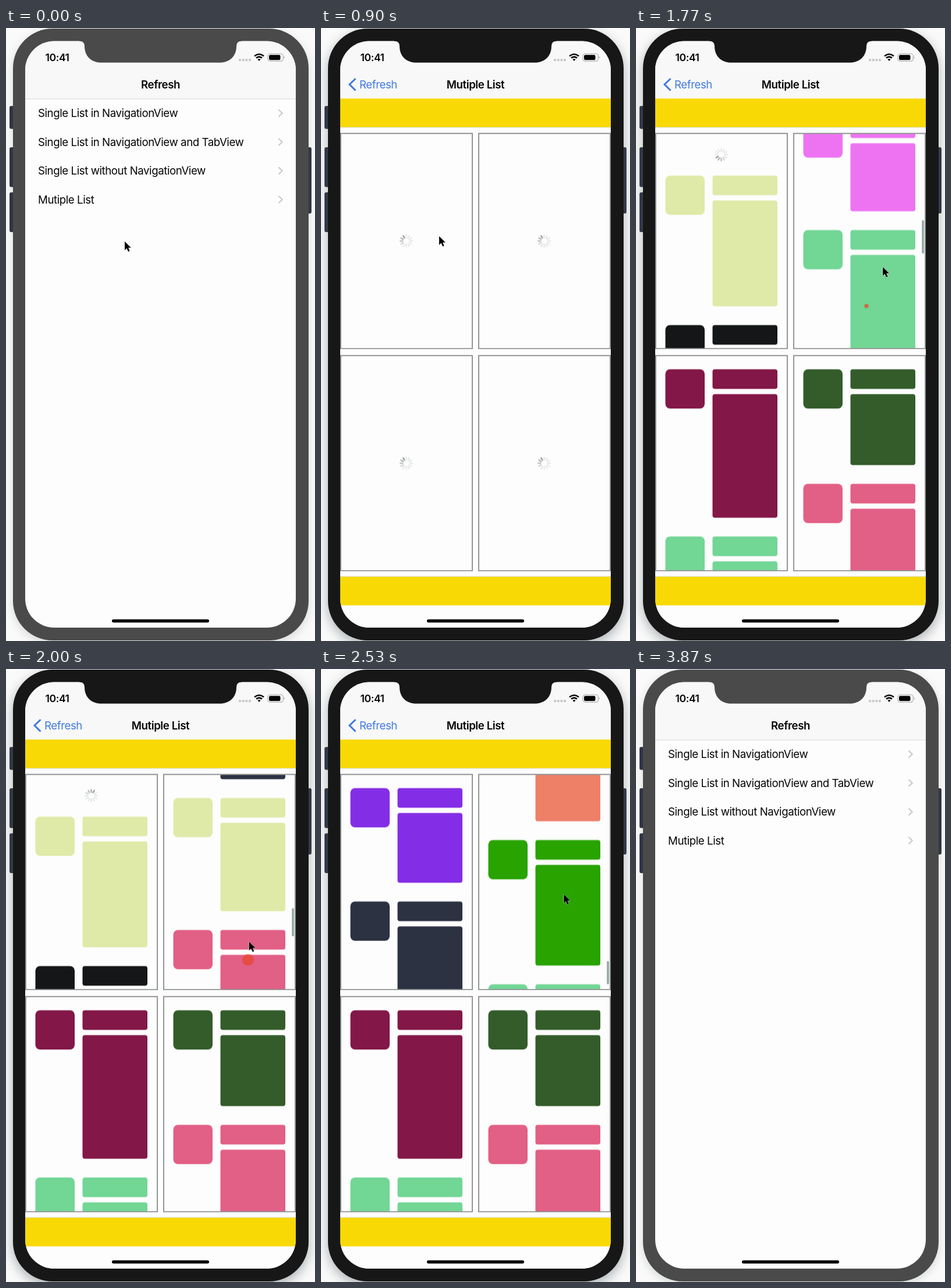
Animation, 531 px wide and 1054 px high, one loop 4370 ms. Source, as an HTML page:

```html
<!DOCTYPE html>
<html lang="en">
<head>
<meta charset="utf-8">
<title>Refresh</title>
<style>
  html, body { margin: 0; width: 100%; height: 100%; overflow: hidden; background: #fafafa; }
  #stage { display: block; width: 531px; height: 1054px; }
  text { font: 400 18.7px Inter, "Open Sans", sans-serif; letter-spacing: -.024em; fill: #050505; }
  .bold { font-weight: 600; }
  .mid { text-anchor: middle; }

  .body, .notch, .slide-in, .slide-out, .loading, .loaded, .pull, .release, .busy, .old, .new,
  .drag, .scroll, .thumb, .cursor, .touch {
    animation: 4370ms linear infinite;
  }

  /* window focus */
  .body { animation-name: body; animation-timing-function: step-end; }
  .notch { animation-name: notch; animation-timing-function: step-end; }
  @keyframes notch { 0% { fill: #4a4a4a } 4% { fill: #171717 } 86.3%, 100% { fill: #4a4a4a } }
  @keyframes body {
    0%, 86.3%, 100% { fill: #4a4a4a; filter: drop-shadow(0 5px 8px rgba(70, 80, 85, .2)) }
    4% { fill: #171717; filter: drop-shadow(0 7px 10px rgba(70, 85, 90, .45)) }
  }

  /* page push and pop */
  .slide-in { animation-name: slide-in; }
  .slide-out { animation-name: slide-out; }
  @keyframes slide-in {
    0%, 5.5%, 82%, 100% { transform: translateX(var(--off)); opacity: var(--o, 1) }
    12.5%, 75% { transform: translateX(0); opacity: 1 }
    5.5%, 75% { animation-timing-function: cubic-bezier(.2, .8, .2, 1) }
  }
  @keyframes slide-out {
    0%, 5.5%, 82%, 100% { transform: translateX(0); opacity: 1 }
    12.5%, 75% { transform: translateX(var(--off)); opacity: var(--o, 1) }
    5.5%, 75% { animation-timing-function: cubic-bezier(.2, .8, .2, 1) }
  }

  /* hard switches */
  .loading, .loaded, .pull, .release, .busy, .old, .new { animation-timing-function: step-end; }
  .loading { animation-name: loading; }
  .loaded { animation-name: loaded; }
  .pull { animation-name: pull; }
  .release { animation-name: release; }
  .busy { animation-name: busy; }
  .old { animation-name: old; }
  .new { animation-name: new; }
  @keyframes loading { 0% { opacity: 1 } 24%, 100% { opacity: 0 } }
  @keyframes loaded { 0% { opacity: 0 } 24%, 100% { opacity: 1 } }
  @keyframes pull { 0% { opacity: 1 } 29%, 100% { opacity: 0 } }
  @keyframes release { 0%, 31%, 100% { opacity: 0 } 29% { opacity: 1 } }
  @keyframes busy { 0%, 49%, 100% { opacity: 0 } 31% { opacity: 1 } }
  @keyframes old { 0% { opacity: 1 } 46.5%, 100% { opacity: 0 } }
  @keyframes new { 0% { opacity: 0 } 46.5%, 100% { opacity: 1 } }

  .spin { animation: spin 546.25ms steps(12) infinite; }
  @keyframes spin { to { transform: rotate(360deg) } }

  .drag { animation-name: drag; }
  @keyframes drag {
    0%, 25.5%, 49.5%, 100% { transform: translateY(0) }
    28.15% { transform: translateY(98px); animation-timing-function: ease-out }
    30%, 31% { transform: translateY(115px) }
    31%, 46.5% { animation-timing-function: ease-out }
    33.5%, 46.5% { transform: translateY(49px) }
  }

  .scroll { animation-name: scroll; }
  @keyframes scroll {
    0%, 33.5% { transform: translateY(0) }
    40.5% { transform: translateY(-930px) }
    44% { transform: translateY(-1250px) }
    47% { transform: translateY(-1800px) }
    51.03% { transform: translateY(-2400px) }
    55% { transform: translateY(-2820px); animation-timing-function: ease-out }
    60%, 100% { transform: translateY(-2960px) }
  }
  .thumb { animation-name: thumb; }
  @keyframes thumb {
    0%, 33.4% { y: 4px; height: 75px; opacity: 0 }
    33.5% { y: 4px; height: 75px; opacity: 1 }
    40.5% { y: 149.5px; height: 58px }
    51.03% { y: 311px; height: 40px }
    60% { y: 325px; height: 40px; opacity: 1 }
    64%, 100% { y: 325px; height: 40px; opacity: 0 }
  }

  .cursor { animation-name: cursor; animation-timing-function: ease-in-out; }
  @keyframes cursor {
    0% { transform: translate(204px, 367px); opacity: 1 }
    3.2%, 8% { transform: translate(203px, 298px) }
    16%, 20.7% { transform: translate(203px, 358px) }
    24%, 25.5% { transform: translate(196px, 270px) }
    28.15% { transform: translate(190px, 516px) }
    30%, 31% { transform: translate(190px, 556px) }
    33.5% { transform: translate(396px, 478px) }
    36.5% { transform: translate(410px, 330px) }
    39% { transform: translate(396px, 478px) }
    40.5% { transform: translate(424px, 411px) }
    42.5% { transform: translate(430px, 340px) }
    45% { transform: translate(416px, 500px) }
    47.5% { transform: translate(424px, 350px) }
    51.03% { transform: translate(419px, 480px) }
    54% { transform: translate(424px, 350px) }
    60% { transform: translate(415px, 400px) }
    70% { transform: translate(82px, 97px) }
    72.5%, 76% { transform: translate(78px, 93px) }
    80% { transform: translate(130px, 220px) }
    86.2% { transform: translate(300px, 1060px); opacity: 1 }
    86.3%, 100% { transform: translate(300px, 1060px); opacity: 0 }
  }

  .touch { animation-name: touch; }
  @keyframes touch {
    0%, 3.6% { transform: translate(203px, 298px) scale(0) }
    4.3%, 5% { transform: translate(203px, 298px) scale(1) }
    6%, 6.1% { transform: translate(203px, 298px) scale(0) }
    6.2%, 25.5% { transform: translate(196px, 270px) scale(0) }
    26.5%, 30.5% { transform: translate(196px, 270px) scale(1) }
    31.5% { transform: translate(196px, 270px) scale(0) }
    31.6%, 33.5% { transform: translate(396px, 478px) scale(0) }
    34.3%, 36% { transform: translate(396px, 478px) scale(1) }
    37%, 40.2% { transform: translate(396px, 478px) scale(0) }
    41.3%, 42% { transform: translate(396px, 478px) scale(1) }
    43% { transform: translate(396px, 478px) scale(0) }
    43.1%, 45% { transform: translate(416px, 500px) scale(0) }
    46%, 47% { transform: translate(416px, 500px) scale(1) }
    48% { transform: translate(416px, 500px) scale(0) }
    48.1%, 51.5% { transform: translate(419px, 480px) scale(0) }
    52.3%, 53.4% { transform: translate(419px, 480px) scale(1) }
    54.4% { transform: translate(419px, 480px) scale(0) }
    54.5%, 73.2% { transform: translate(78px, 93px) scale(0) }
    74%, 74.6% { transform: translate(78px, 93px) scale(1) }
    75.5%, 100% { transform: translate(78px, 93px) scale(0) }
  }
</style>
</head>
<body>
<svg id="stage" viewBox="0 0 531 1054">
  <defs>
    <clipPath id="screen"><rect x="33" y="22.5" width="465" height="1008.5" rx="50"/></clipPath>
  </defs>

  <g fill="#2e3346" stroke="#3b3d44">
    <rect x="6.5" y="134.5" width="9" height="38.5" rx="2"/>
    <rect x="6.5" y="205.5" width="9" height="67.5" rx="2"/>
    <rect x="6.5" y="283" width="9" height="67.5" rx="2"/>
    <rect x="515.5" y="205.5" width="9" height="113" rx="2"/>
  </g>
  <rect class="body" x="12" y="1" width="508" height="1052" rx="68"/>

  <g clip-path="url(#screen)">
    <rect x="33" y="22" width="465" height="1010" fill="#fdfdfd"/>
    <g id="menu" class="slide-out" style="--off:-140px"></g>
    <rect x="33" y="22" width="465" height="99.5" fill="#f8f8f8"/>
    <rect x="33" y="121.5" width="465" height="1" fill="#d6d6d6"/>
    <g id="detail" class="slide-in" style="--off:466px"></g>

    <text class="bold mid slide-out" style="--off:-166px;--o:0" x="265.5" y="103.5">Refresh</text>
    <text class="bold mid slide-in" style="--off:160px;--o:0" x="265.5" y="103.5">Mutiple List</text>
    <g class="slide-in" style="--off:0px;--o:0">
      <path d="M59.5 87L49 97L59.5 107.5" fill="none" stroke="#3f78dd" stroke-width="3"/>
    </g>
    <text class="slide-in" style="--off:166px;--o:0;fill:#427adf" x="66" y="103.5">Refresh</text>

    <text class="bold" x="67.5" y="57" style="font-size:17.6px">10:41</text>
    <g fill="#c9c9c9">
      <rect x="400" y="53" width="4" height="4" rx="1"/><rect x="405.7" y="53" width="4" height="4" rx="1"/>
      <rect x="411.4" y="53" width="4" height="4" rx="1"/><rect x="417" y="53" width="4" height="4" rx="1"/>
    </g>
    <g fill="none" stroke="#050505" stroke-width="2.6">
      <path d="M427 48.3Q435 41.7 443 48.3M430 51.6Q435 47.6 440 51.6"/>
      <path d="M435 56.7L432.5 54Q435 52.1 437.5 54Z" fill="#050505" stroke="none"/>
    </g>
    <rect x="450" y="44.3" width="26.4" height="12.6" rx="3.8" fill="none" stroke="#a9a9a9" stroke-width="1.1"/>
    <rect x="452" y="46.2" width="19.5" height="8.8" rx="2.2" fill="#050505"/>
    <path d="M477.8 48.4Q480 50.6 477.8 52.8Z" fill="#a0a0a0"/>
    <rect x="182" y="1016.8" width="167" height="5.4" rx="2.7" fill="#000"/>
  </g>

  <path class="notch" d="M126 21H405V22.5Q396 22.5 396 31C396 49 384 59.5 367 59.5H164C147 59.5 135 49 135 31Q135 22.5 126 22.5Z"/>

  <circle class="touch" r="12.5" fill="#e9442b" opacity=".72"/>
  <path class="cursor" d="M0 0V15L3.5 11.8L6 17.6L8.6 16.5L6.2 10.8H10.8Z" fill="#000" stroke="#fff" stroke-width="1" paint-order="stroke"/>
</svg>

<script>
  const rect = (x, y, w, h, fill, rx = 0) =>
    `<rect x="${x}" y="${y}" width="${w}" height="${h}" rx="${rx}" fill="${fill}"/>`;

  const menuRow = (label, i) => {
    const y = 146.5 + i * 49.5;
    return `<text x="55" y="${y + 6.5}">${label}</text>
      <path d="M468.5 ${y - 6}l6.2 6l-6.2 6" fill="none" stroke="#c8c8cb" stroke-width="2.1"/>`;
  };

  // Each card is [colour, body height].
  const cards = list => {
    let y = 24.5;
    return list.map(([color, body]) => {
      const card = rect(17.5, y, 67.5, 67.5, color, 8)
        + rect(98.5, y, 111.5, 33.8, color, 4)
        + rect(98.5, y + 42.7, 111.5, body, color, 4);
      y += body + 75;
      return card;
    }).join('');
  };

  const spinner = (y, head) => {
    const spokes = Array.from({ length: 12 }, (_, i) =>
      `<path d="M0 -6V-10.5" transform="rotate(${(head - i) * 30})" opacity="${Math.max(.22, 1 - i * .19)}"/>`);
    return `<g transform="translate(113.5 ${y})" stroke="#89918f" stroke-width="2.1" stroke-linecap="round">
      <g class="spin">${spokes.join('')}</g></g>`;
  };

  const panel = (x, y, content) =>
    `<svg x="${x}" y="${y}" width="228" height="372">
      <g class="loading">${spinner(186, 4)}</g>
      <g class="loaded">${content}</g>
      <rect x="1" y="1" width="226" height="370" fill="none" stroke="#929595" stroke-width="2"/>
    </svg>`;

  const mint = '#72d695', violet = '#842de6', navy = '#2c3242', pink = '#e25f85',
    teal = '#4bdbd4', maroon = '#831747', moss = '#335c2a', lime = '#dfeaa8';

  const refreshable = `<g class="drag">
    <text class="mid pull" x="113.5" y="-5">Pull to refresh</text>
    <text class="mid release" x="113.5" y="-5">Release to refresh</text>
    <g class="busy">${spinner(-11.5, 6)}</g>
    <g class="old">${cards([[lime, 182], ['#151618', 150]])}</g>
    <g class="new">${cards([[violet, 120], [navy, 170]])}</g>
  </g>`;

  const longList = `<g class="scroll">${cards([
    ['#e966be', 212], [teal, 220], [violet, 226], ['#ee73f2', 117], [mint, 190],
    [navy, 180], [lime, 152], [pink, 200], [maroon, 150],
    ['#9aa9a7', 160], ['#ce2017', 160], ['#ee8068', 150], ['#28a300', 173], [mint, 118]
  ])}</g><rect class="thumb" x="221.3" y="4" width="3.6" height="75" rx="1.8" fill="#96a4a4"/>`;

  document.getElementById('menu').innerHTML = [
    'Single List in NavigationView',
    'Single List in NavigationView and TabView',
    'Single List without NavigationView',
    'Mutiple List'
  ].map(menuRow).join('');

  document.getElementById('detail').innerHTML =
    rect(33, 121, 465, 911, '#fdfdfd')
    + rect(33, 121.3, 465, 49.4, '#f9d905') + rect(33, 170.5, 465, .8, '#cfcfb8')
    + rect(33, 943.3, 465, 49.4, '#f9d905') + rect(33, 942.6, 465, .8, '#cfcfb8')
    + panel(33, 180.3, refreshable)
    + panel(270, 180.3, longList)
    + panel(33, 562.3, cards([[maroon, 212.5], [mint, 150]]))
    + panel(270, 562.3, cards([[moss, 122], [pink, 170]]));
</script>
</body>
</html>
```
